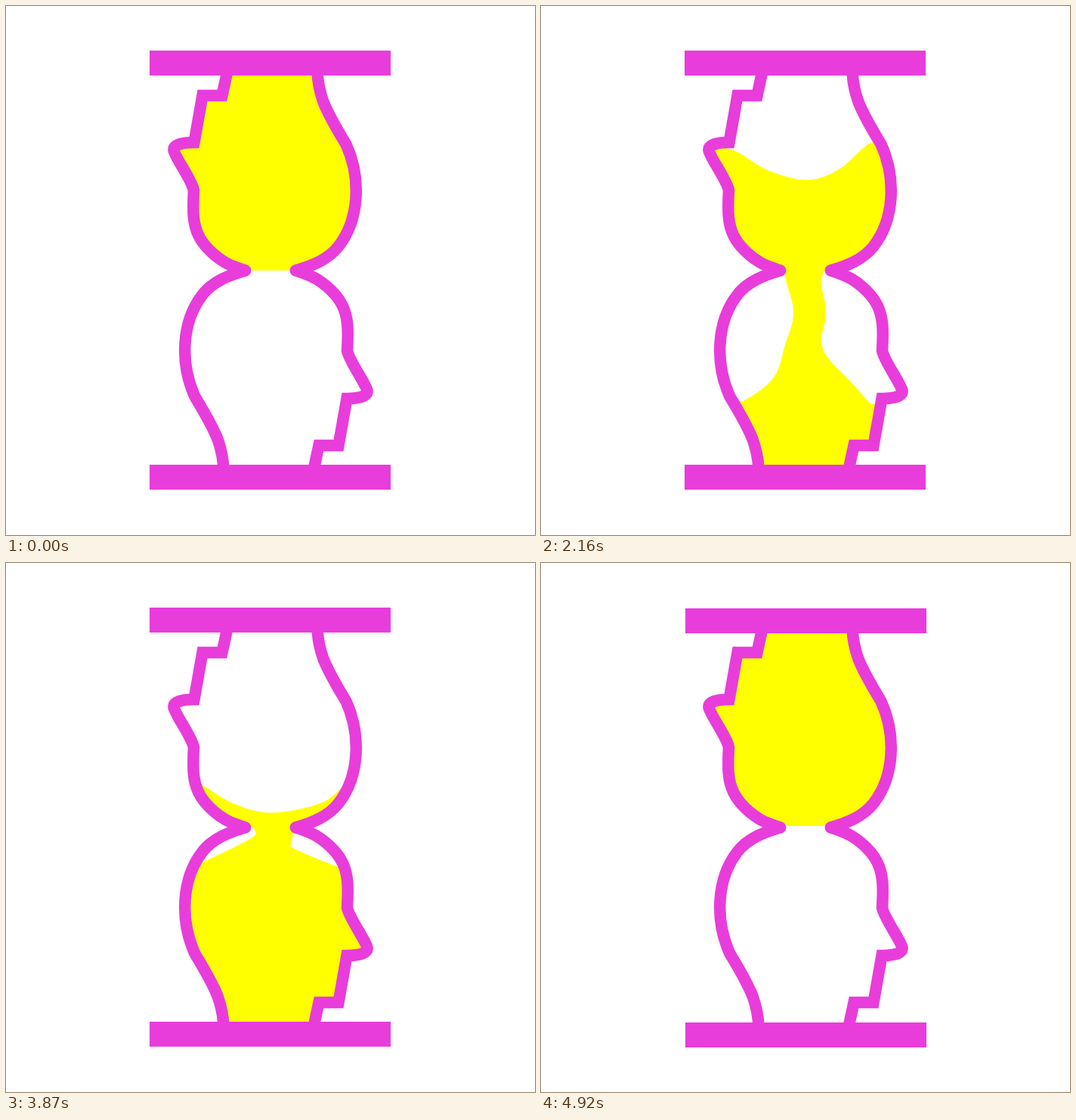
Write an HTML page that moves like this. It is 700 px wide and 700 px high and loops after 4.95 s.

```html
<!DOCTYPE html>
<html lang="en">
<head>
<meta charset="utf-8">
<title>Hourglass heads</title>
<style>
  html, body { margin: 0; width: 100%; height: 100%; overflow: hidden; background: #fff; }
  svg { display: block; width: 100%; height: 100%; }
  .glass { fill: none; stroke: #e83ddb; stroke-width: 15.5; stroke-linecap: round; stroke-miterlimit: 8; }
  .bar { fill: #e83ddb; }
  .sand { fill: #ff0; }
</style>
</head>
<body>
<svg viewBox="0 0 700 700">
  <defs>
    <clipPath id="upper"><path id="bulb"/></clipPath>
    <clipPath id="lower"><path id="bulbTurned" transform="rotate(180 350 350)"/></clipPath>
  </defs>
  <g id="hourglass">
    <g clip-path="url(#upper)"><path id="top" class="sand"/></g>
    <g clip-path="url(#lower)"><path id="bottom" class="sand"/></g>
    <path id="outline" class="glass"/>
    <path id="outlineTurned" class="glass" transform="rotate(180 350 350)"/>
    <rect class="bar" x="190" y="59" width="319" height="33"/>
    <rect class="bar" x="190" y="607" width="319" height="33"/>
  </g>
</svg>
<script>
const LOOP = 4950, STEP = 30;
const TURN = { start: 4205, length: 715, x1: 0.94, x2: 0.2 };
const CEILING = 91, NECK = 350, FLOOR = 612, EMPTY = 4200;

const face = '293 86L286 118.5L260 118.5L249 180.5C232 180.5 221 184 222 191' +
  'C224 201 246 230 248.5 244C247 270 247 288 255 304C264 322 286 340 304 345.5L316.5 350';
const skull = '383.5 350C404 344 426 336 440 318C468 282 470 227 450 183' +
  'C438 163 428 147 420 127C415 113 412.5 103 412 86';

const $ = id => document.getElementById(id);
const { min, max, exp, sin, sqrt, PI } = Math;

// Catmull-Rom curve through the points, without the opening move
function curve(pts) {
  let d = '';
  for (let i = 0; i < pts.length - 1; i++) {
    const p = pts[i], q = pts[i + 1];
    const before = pts[i - 1] || p, after = pts[i + 2] || q;
    const c = [0, 1].map(n => p[n] + (q[n] - before[n]) / 6);
    const e = [0, 1].map(n => q[n] - (after[n] - p[n]) / 6);
    d += `C${c} ${e} ${q}`;
  }
  return d;
}

// A hollow that sinks steadily; its right-hand hump drifts towards the wall
function topSand(t) {
  const mid = min(CEILING + 0.16 * t, 104 + 0.0585 * t, NECK);
  const depth = min(1, (mid - CEILING) / 72, (NECK - mid) / 20);
  const hump = 404 + t / 68;
  const pts = [
    [225, 46], [258, 38], [300, 13], [352, 0],
    [hump - 40, 15], [hump, 49], [hump + 30, 47]
  ].map(([x, rise]) => [x, mid - rise * depth]);
  return `M200 ${NECK}L200 ${pts[0][1]}L${pts[0]}${curve(pts)}L500 ${pts[6][1]}L500 ${NECK}Z`;
}

// How far the heap reaches out from the stream at height y
function heapReach(y, level, limit, slope, power) {
  const h = level - y;
  if (h <= 0) return 300;
  const room = level - NECK;
  const height = min(limit, room * slope);
  const width = max(0, min(80, 85 - 0.4 * (level - 478)));
  return width * max(0, 1 - h / height) ** min(power, room / 50);
}

function bottomSand(t) {
  const tip = NECK + 0.345 * t;
  const level = min(602 - 0.0715 * (t - 1080), NECK + 0.16 * (EMPTY - t));
  const surface = t < EMPTY ? NECK - 1 : NECK + 2;
  const left = [], right = [];
  for (let y = surface; y <= min(tip, FLOOR); y += 2) {
    const mid = 351.5 + 4 * sin(2 * PI * (y - 362 - 0.363 * (t - 1320)) / 95);
    const half = 21.5 + 6 * exp((NECK - y) / 12);
    const taper = sqrt(min(1, (tip - y) / 60));
    left.push([mid - taper * (half + heapReach(y, level, 115, 0.82, 2.8)), y]);
    right.unshift([mid + taper * (half + heapReach(y, level + 3, 92, 0.55, 1.7)), y]);
  }
  return 'M' + [...left, ...right].join('L') + 'Z';
}

function turnAngle(t) {
  const x = (t - TURN.start) / TURN.length;
  if (x <= 0) return 0;
  if (x >= 1) return -180;
  let lo = 0, hi = 1;
  for (let i = 0; i < 30; i++) {
    const s = (lo + hi) / 2, r = 1 - s;
    if (3 * TURN.x1 * s * r * r + 3 * TURN.x2 * s * s * r + s ** 3 < x) lo = s;
    else hi = s;
  }
  return -180 * lo * lo * (3 - 2 * lo);
}

function draw(t) {
  $('top').setAttribute('d', topSand(t));
  $('bottom').setAttribute('d', bottomSand(t));
  $('hourglass').setAttribute('transform', `rotate(${turnAngle(t)} 350 350)`);
}

for (const id of ['bulb', 'bulbTurned']) $(id).setAttribute('d', `M${face}L${skull}Z`);
for (const id of ['outline', 'outlineTurned']) $(id).setAttribute('d', `M${face}M${skull}`);

const begin = performance.now();
function tick() {
  const t = (performance.now() - begin) % LOOP;
  draw(Math.floor(t / STEP) * STEP);
  requestAnimationFrame(tick);
}
tick();
</script>
</body>
</html>
```
